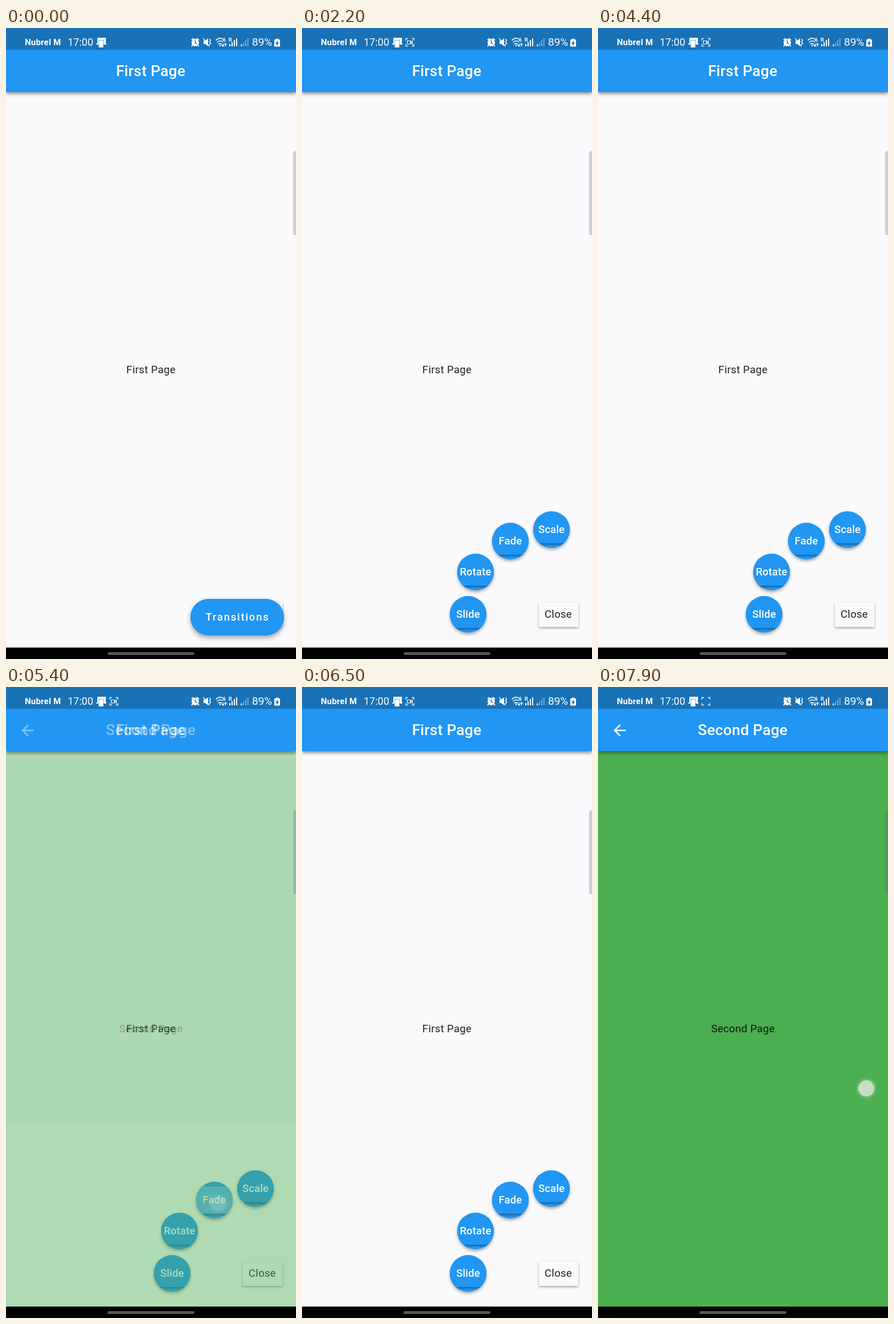
Recreate the animation shown at these times as an HTML page. Size 508x1102 px, loop 8000 ms.

```html
<!DOCTYPE html>
<html lang="en">
<head>
<meta charset="utf-8">
<title>Page transitions</title>
<style>
html, body { margin: 0; width: 100%; height: 100%; overflow: hidden; background: #000; }
body { position: relative; font: 18.5px Roboto, sans-serif; }
body div, svg { position: absolute; }
.page { width: 508px; height: 1082px; overflow: hidden; }
#first { background: #fafafc; }
#second { background: #4caf50; }
.bar { width: 508px; height: 112px; background: #2196f3; box-shadow: 0 var(--drop, 3px) 6px rgba(0,0,0,.45); }
.t { transform: translate(-50%, -50%); white-space: nowrap; line-height: 1.2; }
.title { left: 253.5px; top: 76px; color: #fff; font-weight: 500; font-size: 26.4px; letter-spacing: .2px; }
.body { left: 254px; top: 597px; color: rgba(0,0,0,.87); letter-spacing: .33px; }
#close { left: 415px; top: 1003px; width: 69px; height: 43px; background: #fafafc; box-shadow: 0 2px 4px rgba(0,0,0,.35); }
#close .t { left: 34px; top: 21px; color: rgba(0,0,0,.87); letter-spacing: .3px; }
#fab { left: 322.5px; top: 997px; width: 164.5px; height: 64px; border-radius: 32px; background: #2196f3; box-shadow: 0 4px 8px rgba(0,0,0,.35); }
#fab .t { left: 83px; top: 32px; color: #fff; font-weight: 500; letter-spacing: 1.75px; }
.round { width: 64px; height: 64px; margin: -32px; border-radius: 50%; background: #2196f3; box-shadow: 0 3px 5px rgba(0,0,0,.35); }
.clip { inset: 0; border-radius: 50%; overflow: hidden; }
.band { top: 8px; width: 64px; height: 48px; background: #2196f3; box-shadow: 0 2px 3px rgba(0,0,0,.4); }
.glow { top: 8px; width: 64px; height: 48px; background: #fff; opacity: 0; }
.round .t { left: 32px; top: 32px; color: #fff; font-weight: 500; letter-spacing: .13px; }
#shade { width: 508px; height: 38px; background: rgba(0,0,0,.25); }
#handle { left: 503px; top: 215px; width: 8px; height: 147px; border-radius: 4px; background: rgba(110,90,146,.3); }
#nav { top: 1082px; width: 508px; height: 20px; background: #000; }
#nav div { left: 178px; top: 8px; width: 152px; height: 5px; border-radius: 3px; background: #575757; }
#dot { width: 28px; height: 28px; margin: -14px; border-radius: 50%; background: rgba(235,237,235,.76); box-shadow: 0 0 4px 3px rgba(225,235,225,.3); }
</style>
</head>
<body>
<div class="page" id="first">
  <div class="bar"></div>
  <div class="t title">First Page</div>
  <div class="t body">First Page</div>
  <div id="close"><div class="t">Close</div></div>
  <div id="menu"></div>
  <div id="fab"><div class="t">Transitions</div></div>
</div>
<div class="page" id="second">
  <div class="bar"></div>
  <svg style="left:21.7px;top:59.7px" width="31.7" height="31.7" viewBox="0 0 24 24"><path fill="#fff" d="M20 11H7.83l5.59-5.59L12 4l-8 8 8 8 1.41-1.41L7.83 13H20z"/></svg>
  <div class="t title">Second Page</div>
  <div class="t body">Second Page</div>
</div>
<div id="shade"></div>
<div id="handle"></div>
<svg width="508" height="38" fill="#fff" font-family="Roboto, sans-serif">
  <text x="33" y="29.5" font-size="15" font-weight="700" letter-spacing=".2">Nubrel M</text>
  <text x="108" y="31" font-size="18">17:00</text>
  <path d="M160 17h15v10h1v2h-5v-8h-9v8h-4v-2h2z"/>
  <rect x="162.500" y="21.500" width="8" height="12.500" rx="1"/>
  <g id="record">
    <path fill="none" stroke="#fff" stroke-width="1.3" d="M182 22v-3.500h3.500M192.500 18.500h3.500v3.500M196 28v3.500h-3.500M185.500 31.500h-3.500v-3.500"/>
    <path id="camera" fill="none" stroke="#fff" stroke-width="1.2" d="M184.600 22.500h5.500v5.500h-5.500zM190 25l3.200-2.300v5.200z"/>
  </g>
  <g id="alarm">
    <circle cx="331.500" cy="25.500" r="6.500"/>
    <path fill="none" stroke="#fff" stroke-width="2" d="M325 21l4-3M338 21l-4-3M327 30l-2 2M336 30l2 2"/>
    <path fill="none" stroke="#1b6db6" stroke-width="1.500" d="M331.500 21.500v4.300l3 1.700"/>
  </g>
  <path d="M346 22h3l5-4v14l-5-4h-3z"/>
  <path fill="none" stroke="#fff" stroke-width="1.400" d="M345.500 18l11 14M356.500 19l2 2.500-2 2.500 2 2.500-2 3"/>
  <g fill="none" stroke="#fff" stroke-width="1.600">
    <path d="M367.500 21.500q7-6 12-2M369.500 25q5-4.500 10-1M372 28.300q3-2.500 6 0"/>
    <path d="M380 27v5m-2-2l2 2 2-2M384.500 32v-5m-2 2l2-2 2 2" stroke-width="1.300"/>
  </g>
  <circle cx="375" cy="30.500" r="1.300"/>
  <text x="379.500" y="24" font-size="9" font-weight="700">6</text>
  <text x="390" y="24" font-size="9" font-weight="700">R</text>
  <path d="M391 28h2v4h-2zM395 25h2v7h-2zM399 21h2v11h-2zM403 18h2v14h-2zM411.500 28.500h2v3.500h-2z"/>
  <path opacity=".4" d="M415.300 25h2v7h-2zM419 21.500h2v10.500h-2zM422.700 18h2v14h-2z"/>
  <text x="431" y="31" font-size="19">89%</text>
  <path d="M473 18.500h4v1.500h3v12.500h-10v-12.500h3z"/>
  <path fill="#1b5a98" d="M476 21.500l-4 6h2.500l-.5 4 4-6h-2.500z"/>
</svg>
<svg id="chevron" style="left:430px;top:590px" width="28" height="40"><path d="M20 6L8 19.500 20 33" fill="none" stroke="#35563b" stroke-width="2.500" opacity=".55"/></svg>
<div id="nav"><div></div></div>
<div id="dot"></div>
<script>
const LOOP = 8000, STEP = 100, ROUTE_MS = 300, OPEN_AT = 1500, OPEN_MS = 250;
const ANCHOR = { x: 437, y: 1024 };
const $ = id => document.getElementById(id);
const clamp = v => Math.max(0, Math.min(1, v));
const lerp = (a, b, p) => a + (b - a) * p;

const buttons = [
  { label: 'Slide', x: 291, y: 1024 },
  { label: 'Rotate', x: 304, y: 950 },
  { label: 'Fade', x: 365, y: 896 },
  { label: 'Scale', x: 437, y: 876 }
];
for (const b of buttons) {
  b.el = document.createElement('div');
  b.el.className = 'round';
  b.el.innerHTML = `<div class="clip"><div class="band"></div><div class="glow"></div></div><div class="t">${b.label}</div>`;
  b.glow = b.el.querySelector('.glow');
  $('menu').append(b.el);
}

const routes = [
  { kind: 'Scale', push: 2870, pop: 3970 },
  { kind: 'Fade', push: 5270, pop: 6170 },
  { kind: 'Rotate', push: 7050, pop: Infinity }
];

const tap = (down, up, x, y, target) => ({ down, up, x, y, toX: x, toY: y, target });
const swipe = down => ({ down, up: down + 100, x: 490, y: 696, toX: 392, toY: 721, edge: true });
const touches = [
  tap(1360, 1500, 420, 1034),
  tap(2760, 2870, 442, 884, 'Scale'),
  swipe(3880),
  tap(5060, 5260, 372, 902, 'Fade'),
  swipe(6080),
  tap(6960, 7040, 314, 955, 'Rotate'),
  swipe(7880)
];

function drawMenu(t) {
  const p = clamp((t - OPEN_AT) / OPEN_MS);
  const e = 1 - (1 - p) ** 2;
  for (const b of buttons) {
    Object.assign(b.el.style, {
      left: lerp(ANCHOR.x, b.x, e) + 'px',
      top: lerp(ANCHOR.y, b.y, e) + 'px',
      opacity: e,
      transform: `rotate(${(1 - e) * 90}deg)`
    });
    const pressed = touches.some(k => k.target === b.label && t >= k.down && t < k.up + 250);
    b.glow.style.opacity = pressed ? .25 : 0;
  }
  $('fab').style.opacity = 1 - clamp((p - .25) / .75);
  $('fab').style.transform = `scale(${1 - .3 * clamp(p * 2)})`;
}

function drawRoute(t) {
  const page = $('second'), style = page.style;
  const r = routes.findLast(r => t >= r.push);
  const p = r ? clamp((t - r.push) / ROUTE_MS) - clamp((t - r.pop) / ROUTE_MS) : 0;
  style.visibility = p > 0 ? 'visible' : 'hidden';
  if (!r) return;
  const turn = r.kind === 'Rotate' ? p * 360 + (p < 1 ? .12 : 0) : 0;
  style.opacity = r.kind === 'Fade' ? p : 1;
  style.transform = r.kind === 'Scale' ? `scale(${p})` : `rotate(${turn}deg)`;
  // the light stays above the screen while the page turns
  style.setProperty('--drop', 3 * Math.cos(turn * Math.PI / 180) + 'px');
}

function drawTouch(t) {
  const k = touches.findLast(k => t >= k.down);
  const p = k ? clamp((t - k.down) / 100) : 0;
  const since = k ? t - k.up : Infinity;
  const dot = $('dot').style;
  dot.opacity = 1 - clamp((since - 20) / 160);
  if (k) {
    dot.left = lerp(k.x, k.toX, p) + 'px';
    dot.top = lerp(k.y, k.toY, p) + 'px';
  }
  $('chevron').style.opacity = k && k.edge && p > .3 ? 1 - clamp((since - 20) / 260) : 0;
}

function frame(now) {
  const t = Math.floor(now % LOOP / STEP) * STEP;
  drawMenu(t);
  drawRoute(t);
  drawTouch(t);
  $('record').style.opacity = t < 100 ? 0 : 1;
  $('camera').style.opacity = Math.floor((t - 100) / 500) % 2 ? 0 : 1;
  requestAnimationFrame(frame);
}

const start = performance.now();
const tick = now => frame(Math.max(0, now - start));
(function loop() {
  tick(performance.now());
})();
</script>
</body>
</html>
```
